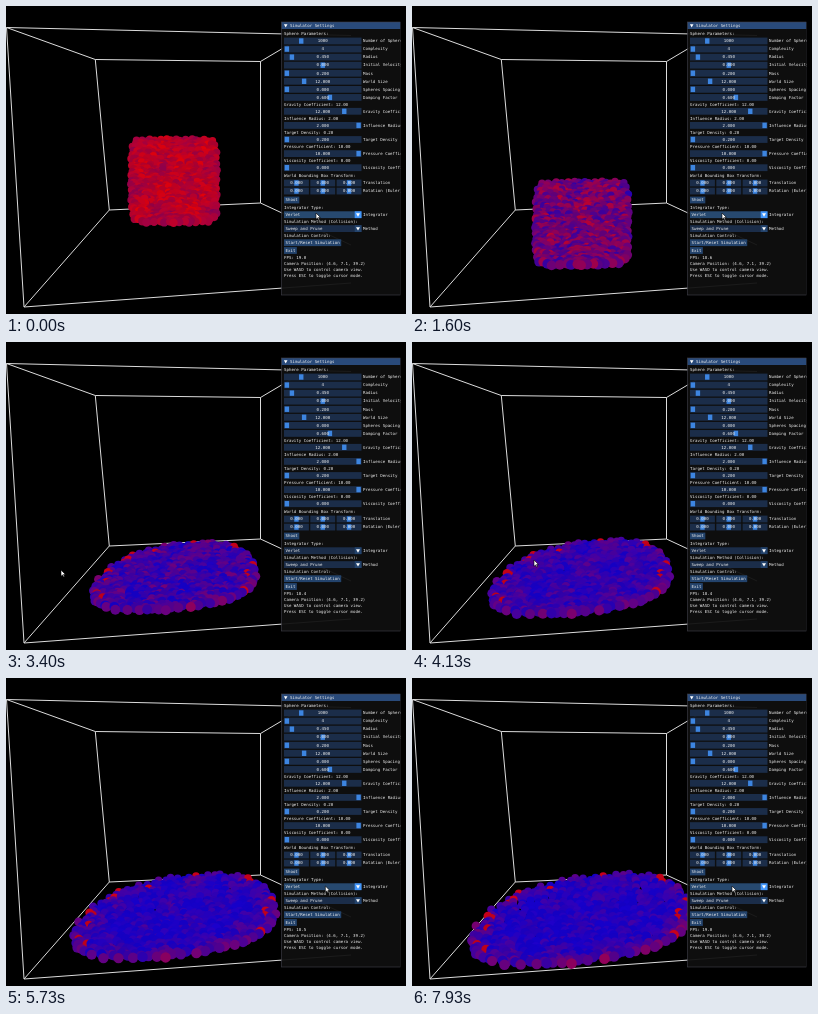
Recreate the animation shown at these times as an HTML page with a canvas. Size 400 by 308 pixels, loop 8000 ms.

```html
<!DOCTYPE html>
<html lang="en">
<head>
<meta charset="utf-8">
<title>Simulator</title>
<style>
html, body { margin: 0; width: 100%; height: 100%; overflow: hidden; background: #000; }
canvas { display: block; width: 100%; height: 100%; }
</style>
</head>
<body>
<canvas id="stage" width="400" height="308"></canvas>
<script>
const LOOP = 8000, STEP = 66.67, COUNT = 720;
const ctx = document.getElementById('stage').getContext('2d');

const clamp = (v, lo = 0, hi = 1) => Math.min(hi, Math.max(lo, v));
const mix = (a, b, k) => a + (b - a) * k;
const bump = (v, width) => Math.exp(-((v / width) ** 2));

function smooth(from, to, t) {
  const k = clamp((t - from) / (to - from));
  return k * k * (3 - 2 * k);
}

function random(n) {
  const v = Math.sin(n * 127.1 + 11.7) * 43758.5453;
  return v - Math.floor(v);
}

const spheres = Array.from({ length: COUNT }, (_, i) => ({
  angle: i * 2.399963,
  r: Math.sqrt((i + .5) / COUNT),
  noise: random(i) * 2 - 1,
  spark: random(i + 3000),
  phase: random(i + 6000) * 6.28
})).sort((a, b) => a.r * Math.sin(a.angle) - b.r * Math.sin(b.angle));

// A block falls, collapses on the floor and spreads into a puddle.
function fluidAt(t) {
  const fall = clamp(t / 1560);
  const collapse = smooth(1400, 2900, t);
  const spread = 1 - Math.exp(-Math.max(0, t - 1450) / 2700);
  const height = 46 - 22.7 * collapse + 26.6 * spread;
  return {
    collapse, height,
    width: 47 + 72 * spread,
    x: 168 + 2 * fall,
    y: 221 + 43 * fall + 31 * spread ** 2 - height,
    power: 9 - 6.5 * collapse,
    taper: .2 * collapse * (1 - .4 * spread),
    lean: -9 * collapse,
    tilt: -13 * spread,
    heat: .14 + .68 * Math.exp(-Math.max(0, t - 700) / 1500),
    variety: .1 + .22 * bump(t - 2330, 900),
    rimHeat: -.1 + .42 * spread
  };
}

function drawFluid(t) {
  const f = fluidAt(t);
  for (const s of spheres) {
    const cos = Math.cos(s.angle), sin = Math.sin(s.angle);
    const reach = (Math.abs(cos) ** f.power + Math.abs(sin) ** f.power) ** (-1 / f.power);
    const r = s.r * reach * (1 + s.noise * .035 * f.collapse);
    const u = r * cos, v = r * sin;
    const size = 3.7 + Math.max(0, f.y + v * f.height - 190) * .016;
    const wobble = 1.2 * (1 - s.r ** 4);
    const x = f.x + u * (f.width - size) * (1 + f.taper * v) + f.lean * v
      + wobble * Math.sin(t * .004 + s.phase);
    const y = f.y + v * (f.height - size) + f.tilt * u
      + wobble * Math.cos(t * .005 + s.phase);

    const patch = .07 * Math.sin(x * .13 + t * .001) * Math.sin(y * .14 + 1);
    let h = f.heat + patch + f.variety * (s.noise + .35 * Math.sin(t * .003 + s.phase));
    h += f.rimHeat * s.r ** 6 * (.65 + .3 * v + .4 * s.noise);
    h -= .25 * bump(t - 800, 500) * bump(x - 180, 3);
    if (s.spark > .94 && (s.r > .85 || t < 3000)) h = mix(h, .88, f.collapse);
    h = clamp(h, .1);
    const light = 225 + s.noise * 10;
    ctx.fillStyle = `rgb(${light * h | 0},0,${light * (1 - h) | 0})`;
    ctx.beginPath();
    ctx.arc(x, y, size, 0, 7);
    ctx.fill();
  }
}

function polyline(...points) {
  ctx.beginPath();
  points.forEach(([x, y]) => ctx.lineTo(x, y));
  ctx.stroke();
}

function drawBox() {
  const nearTop = [.5, 21.5], nearBottom = [18, 301];
  const farTop = [89.3, 53.5], farBottom = [103.3, 204];
  const rightTop = [254.5, 55.5], rightBottom = [254.5, 197];
  ctx.strokeStyle = '#dcdcdc';
  ctx.lineWidth = 1;
  polyline(nearBottom, nearTop, farTop, farBottom, nearBottom, [345, 277]);
  polyline(nearTop, [345, 29.5]);
  polyline(farTop, rightTop, rightBottom, farBottom);
  polyline(rightTop, [300, 28.5]);
  polyline(rightBottom, [345, 239]);
}

// Panel widgets; y is always the middle of the row.
const LEFT = 278, WIDTH = 77.5, LABEL = 357, ROW = 8.06;
const FRAME = '#1b2d49', GRAB = '#3d85e0', BUTTON = '#23436c';

function rect(x, y, w, h, color) {
  ctx.fillStyle = color;
  ctx.fillRect(x, y, w, h);
}

function text(str, x, y, align = 'left') {
  ctx.fillStyle = '#f0f0f0';
  ctx.textAlign = align;
  ctx.fillText(str, x, y + .2);
}

function triangle(x, y, size) {
  ctx.fillStyle = '#fff';
  ctx.beginPath();
  ctx.moveTo(x - size, y - size * .7);
  ctx.lineTo(x + size, y - size * .7);
  ctx.lineTo(x, y + size);
  ctx.fill();
}

function slider(y, value, amount, label = '', x = LEFT, w = WIDTH) {
  rect(x, y - 3.4, w, 6.8, FRAME);
  rect(x + .7 + amount * (w - 5.8), y - 2.7, 4.4, 5.4, GRAB);
  text(value, x + w / 2, y, 'center');
  text(label, LABEL, y);
}

function button(y, label) {
  rect(LEFT, y - 3.4, ctx.measureText(label).width + 3, 6.8, BUTTON);
  text(label, LEFT + 1.5, y);
}

function combo(y, value, label, hover) {
  rect(LEFT, y - 3.4, WIDTH, 6.8, hover ? '#27496f' : FRAME);
  rect(348.7, y - 3.4, 6.8, 6.8, hover ? '#4296fa' : BUTTON);
  triangle(352, y, 2);
  text(value, LEFT + 1.5, y);
  text(label, LABEL, y);
}

const basics = [
  ['1000', .2, 'Number of Spheres'], ['4', 0, 'Complexity'], ['0.450', .07, 'Radius'],
  ['0.000', .5, 'Initial Velocity'], ['0.200', 0, 'Mass'], ['12.000', .24, 'World Size'],
  ['0.000', 0, 'Spheres Spacing'], ['0.600', .6, 'Damping Factor']
];
const forces = [
  ['Gravity Coefficient', '12.00', .8], ['Influence Radius', '2.00', 1],
  ['Target Density', '0.20', 0], ['Pressure Coefficient', '10.00', 1],
  ['Viscosity Coefficient', '0.00', 0]
];

function drawPanel(t, hover) {
  ctx.save();
  ctx.beginPath();
  ctx.rect(275, 15, 119.5, 275);
  ctx.clip();
  rect(275.5, 16, 119, 273, 'rgba(15,15,15,.94)');
  rect(275.5, 16, 119, 7, '#294a7a');
  ctx.strokeStyle = '#41414b';
  ctx.lineWidth = .6;
  ctx.strokeRect(275.5, 16, 119, 273);
  ctx.font = '4.1px "DejaVu Sans Mono", monospace';
  ctx.textBaseline = 'middle';

  triangle(279.7, 19.6, 1.8);
  text('Simulator Settings', 284, 19.6);
  text('Sphere Parameters:', LEFT, 27.8);
  basics.forEach(([value, amount, label], i) => slider(35 + i * ROW, value, amount, label));
  forces.forEach(([name, value, amount], i) => {
    const y = 98.3 + i * 14.1;
    text(`${name}: ${value}`, LEFT, y);
    slider(y + 7, value + '0', amount, name);
  });
  text('World Bounding Box Transform:', LEFT, 170);
  ['Translation', 'Rotation (Euler)'].forEach((label, row) => {
    const y = 177 + row * ROW;
    for (let i = 0; i < 3; i++) slider(y, '0.000', .5, '', LEFT + i * 26.3, 24.9);
    text(label, LABEL, y);
  });
  button(194, 'Shoot');
  text('Integrator Type:', LEFT, 201.7);
  combo(208.7, 'Verlet', 'Integrator', hover);
  text('Simulation Method (Collision):', LEFT, 215.7);
  combo(222.6, 'Sweep and Prune', 'Method', false);
  text('Simulation Control:', LEFT, 229.6);
  button(236.7, 'Start/Reset Simulation');
  button(244.5, 'Exit');
  const fps = 18.4 + .6 * (t / 4000 - 1) ** 2;
  ['FPS: ' + fps.toFixed(1), 'Camera Position: (4.6, 7.1, 39.2)',
    'Use WASD to control camera view.', 'Press ESC to toggle cursor mode.']
    .forEach((line, i) => text(line, LEFT, 251.7 + i * 5.9));
  ctx.restore();
}

// The pointer leaves the combo box, rests on the left and comes back.
function cursorAt(t) {
  const out = smooth(2750, 3200, t);
  const half = smooth(3440, 4700, t);
  const back = smooth(4900, 5700, t);
  return [
    310 - 255 * out + 135 * half + 130 * back,
    207 + 21 * out - 20 * half
  ];
}

function drawCursor(x, y) {
  ctx.beginPath();
  [[0, 0], [0, 6.2], [1.5, 4.9], [2.6, 7], [3.5, 6.5], [2.5, 4.5], [4.4, 4.4]]
    .forEach(([dx, dy]) => ctx.lineTo(x + dx, y + dy));
  ctx.closePath();
  ctx.lineWidth = .6;
  ctx.strokeStyle = '#000';
  ctx.fillStyle = '#fff';
  ctx.fill();
  ctx.stroke();
}

function draw(now) {
  const t = Math.floor(now % LOOP / STEP) * STEP;
  const [x, y] = cursorAt(t);
  rect(0, 0, 400, 308, '#000');
  drawBox();
  drawFluid(t);
  drawPanel(t, x > LEFT && x < LEFT + WIDTH && y > 205 && y < 213);
  drawCursor(x, y);
}

const start = performance.now();
function tick() {
  draw(performance.now() - start);
  requestAnimationFrame(tick);
}
tick();
</script>
</body>
</html>
```
